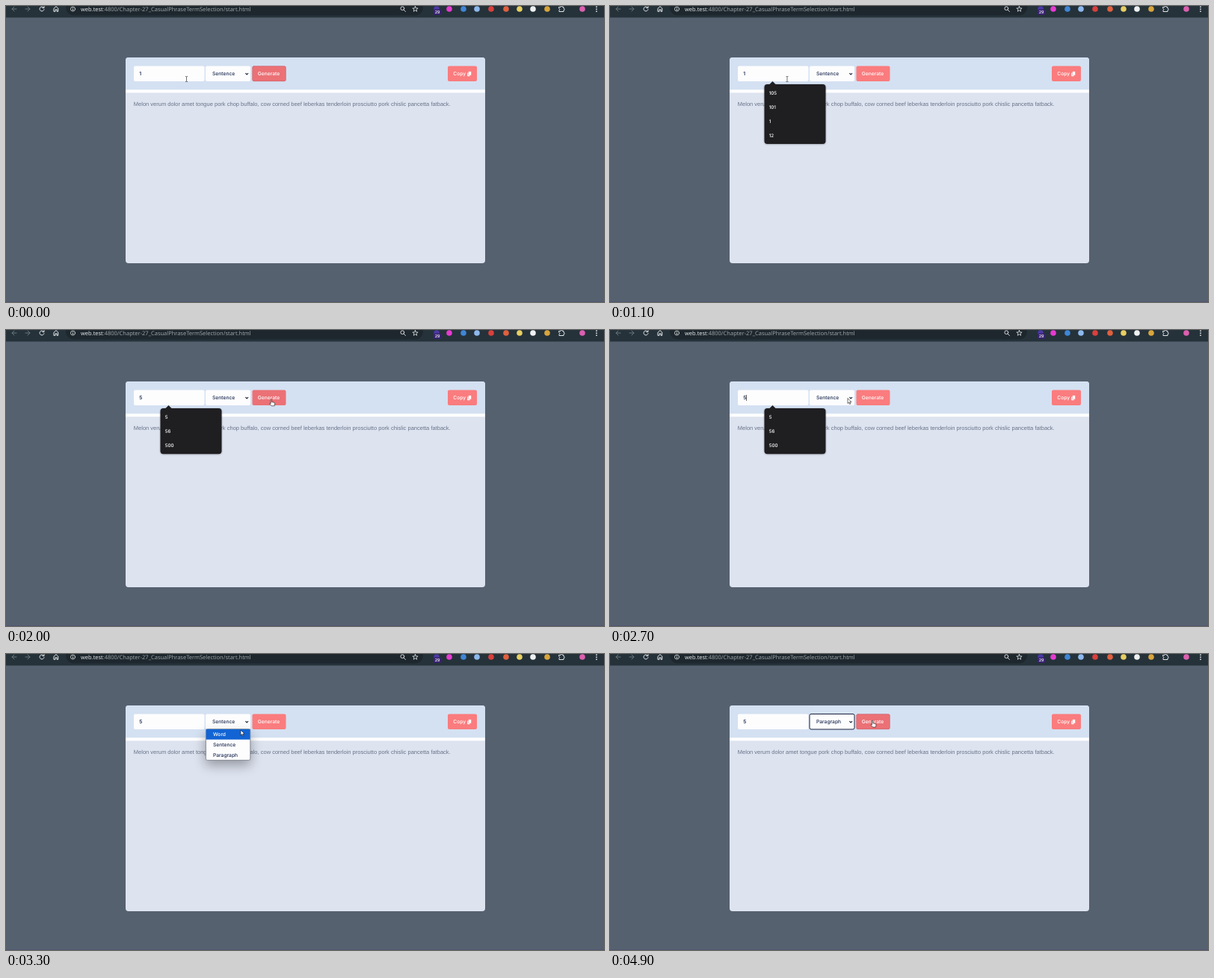
Animation of 800 by 397 pixels, one loop 5000 ms. Source, as an HTML page:

```html
<!DOCTYPE html>
<html lang="en">
<head>
<meta charset="utf-8">
<title>Text generator</title>
<style>
  html, body { margin: 0; width: 100%; height: 100%; overflow: hidden; background: #566170; }
  svg { display: block; width: 100vw; height: 100vh; }
  text { font: 500 6.7px Inter, sans-serif; fill: #1d2b50; text-rendering: geometricPrecision; white-space: pre; }
  .url { font: 7.5px "Open Sans", sans-serif; fill: #a3aaae; }
  .url tspan { fill: #eef1f3; }
  .body { font: 7.52px "Liberation Sans", Arial, sans-serif; fill: #69758a; }
  .light { fill: #fff; }
  .line { fill: none; stroke: #e3e6e8; stroke-linecap: round; stroke-linejoin: round; }
  .dim { stroke: #6b767c; }
</style>
</head>
<body>
<svg viewBox="0 0 800 397">
  <defs>
    <filter id="soft" x="-60%" y="-60%" width="220%" height="260%"><feGaussianBlur stdDeviation="8"/></filter>
    <filter id="near" x="-20%" y="-20%" width="140%" height="140%"><feGaussianBlur stdDeviation="1.2"/></filter>
  </defs>
  <rect width="800" height="397" fill="#566170"/>
  <rect y="396" width="800" height="1" fill="#4f5870"/>

  <!-- browser bar -->
  <rect width="800" height="15.5" fill="#25323a"/>
  <rect x="80" y="-8" width="478" height="20.5" rx="10" fill="#1d272d"/>
  <g class="line">
    <path class="dim" d="M14 4H8M11 1L8 4L11 7M26 4h6M29 1l3 3l-3 3"/>
    <path d="M50.5 2.2A3 3 0 1 0 51 4.6M51 0.6V2.6H48.8"/>
    <path d="M64.3 3L67 .6L69.700 3V7.300H68V4.800H66V7.300H64.300Z"/>
    <circle cx="89.500" cy="4" r="3" stroke-width=".8"/>
    <path d="M89.500 4V5.700M89.500 2.300v.1" stroke-width=".9"/>
    <circle cx="530.300" cy="3.200" r="2.400" stroke-width=".9"/>
    <path d="M532.200 5.200L534.500 7.500" stroke-width=".9"/>
    <path id="star" stroke-width=".8"/>
    <path d="M740 1.500H742A1.300 1.300 0 0 1 744.600 1.500H746V3.300A1.200 1.200 0 0 1 746 5.700V7.500H740V5.500A1.200 1.200 0 0 0 740 3.300Z"/>
  </g>
  <text class="url" x="100" y="6.8"><tspan>web.test</tspan>:4800/Chapter-27_CasualPhraseTermSelection/start.html</text>
  <g id="marks"></g>
  <rect x="572" y="4.500" width="10" height="7.500" rx="1.500" fill="#38256f"/>
  <text class="light" x="573.700" y="10.300" style="font-size:5.500px">29</text>
  <g fill="#e3e6e8"><circle cx="790" cy="1.200" r=".9"/><circle cx="790" cy="4.200" r=".9"/><circle cx="790" cy="7.200" r=".9"/></g>

  <!-- card -->
  <rect x="160" y="69" width="481" height="276" rx="4" fill="#dde3ef"/>
  <path d="M160 113V73a4 4 0 0 1 4-4H637a4 4 0 0 1 4 4V113Z" fill="#d4e1f2"/>
  <rect x="160" y="112.300" width="481" height="4" fill="#fff"/>
  <text class="body" x="170.800" y="134.200">Melon verum dolor amet tongue pork chop buffalo, cow corned beef leberkas tenderloin prosciutto pork chislic pancetta fatback.</text>

  <!-- controls -->
  <rect x="171" y="80.500" width="94.500" height="20.500" rx="2" fill="#fdfdfe"/>
  <text id="count" x="178.300" y="93.400" style="font-weight:600"></text>
  <rect id="caret" x="182.300" y="87" width=".7" height="8" fill="#222"/>
  <rect id="select" x="267" y="80.500" width="60" height="20.500" rx="2" fill="#fdfdfe"/>
  <text id="kind" x="276" y="93.400"></text>
  <path d="M320.400 90.200L322.200 92L324 90.200" fill="none" stroke="#1c2440" stroke-width="1.200"/>
  <rect id="go" x="329.500" y="80.500" width="45" height="20.500" rx="2"/>
  <rect id="dots" x="329.700" y="80.700" width="44.600" height="20.100" rx="2" fill="none" stroke="#a9505c" stroke-width=".7" stroke-dasharray="1 1"/>
  <text class="light" x="336.800" y="93.400">Generate</text>
  <rect x="591" y="80.500" width="39" height="20.500" rx="2" fill="#fa7c7e"/>
  <text class="light" x="598.300" y="93.400">Copy</text>
  <rect x="617.200" y="89.400" width="3.600" height="4.800" rx=".6" fill="#fff"/>
  <rect x="618.600" y="87.800" width="3.900" height="5.100" rx=".6" fill="#fff" stroke="#fa7c7e" stroke-width=".5"/>

  <!-- suggestions -->
  <g id="hints">
    <rect id="hintShade" x="206.500" y="105.500" width="82" rx="4" opacity=".35" filter="url(#near)"/>
    <path d="M213 105.500L217.500 101L222 105.500Z" fill="#1f1e21"/>
    <rect id="hintBox" x="206.500" y="105" width="82" rx="4" fill="#1f1e21"/>
    <g id="hintText"></g>
  </g>

  <!-- option list -->
  <g id="menu">
    <rect x="267" y="108" width="60" height="41" opacity=".34" filter="url(#soft)"/>
    <rect x="267.400" y="100.600" width="59.400" height="41.800" rx="2" fill="#fdfdfe" stroke="#646b78" stroke-width=".7"/>
    <rect id="pick" x="267.700" width="58.900" height="13.800" fill="#1264d4"/>
    <g id="options"></g>
  </g>

  <g id="pointer">
    <path id="beam" d="M-1.500 -3.500H-.5L0 -3L.5 -3.500H1.500M0 -3V3M-1.500 3.500H-.5L0 3L.5 3.500H1.500" fill="none" stroke="#333" stroke-width=".7"/>
    <path id="arrow" d="M0 0V7L1.600 5.500L2.700 8L3.800 7.500L2.700 5.100H5Z" fill="#fff" stroke="#111" stroke-width=".6"/>
    <path id="hand" d="M-.8 4.800V-.4a.7 .7 0 0 1 1.400 0V2.600l3 .6q1.200 .2 1.100 1.500L4.200 7.800H.2L-2.200 5.200q-.3-1 .6-.9Z" fill="#fff" stroke="#111" stroke-width=".6"/>
  </g>
</svg>
<script>
const $ = id => document.getElementById(id);
const show = (id, on) => $(id).style.display = on ? "" : "none";

const marks = [[576, "#4b39a5"], [593, "#e63bd0"], [612, "#3f86d6"], [630, "#8db9ee"], [649, "#d9403c"],
  [669, "#e0603f"], [687, "#e8cf62"], [705, "#eef0f2"], [724, "#d9a53c"], [771, "#dd5fb0"]];
$("marks").innerHTML = marks.map(([x, c]) => `<circle cx="${x}" cy="4" r="3.8" fill="${c}"/>`).join("");

const star = Array.from({ length: 10 }, (_, i) => {
  const a = (i / 5 - .5) * Math.PI, r = i % 2 ? 1.6 : 3.8;
  return `${547.5 + r * Math.cos(a)} ${4.2 + r * Math.sin(a)}`;
});
$("star").setAttribute("d", `M${star.join("L")}Z`);

const kinds = ["Word", "Sentence", "Paragraph"];
$("options").innerHTML = kinds.map((k, i) => `<text x="277" y="${110 + 13.8 * i}">${k}</text>`).join("");

// time, x, y of the pointer
const path = [
  [0, 241.5, 98], [600, 237, 98], [1500, 237, 98], [2000, 355, 94], [2200, 368, 92], [2600, 322, 92.5],
  [2700, 318, 91.5], [3000, 318, 91.5], [3300, 314, 102], [3600, 314, 104], [3800, 312, 118],
  [4100, 310, 131], [4300, 310, 131], [4700, 349, 92], [4900, 351.3, 90.3]
];

function pointerAt(t) {
  const i = path.findIndex(p => p[0] >= t);
  if (i < 1) return path[0].slice(1);
  const [a, b] = [path[i - 1], path[i]];
  const u = (t - a[0]) / (b[0] - a[0]), k = u * u * (3 - 2 * u);
  return [a[1] + (b[1] - a[1]) * k, a[2] + (b[2] - a[2]) * k];
}

function setHints(list) {
  show("hints", list.length);
  const height = 4.5 + 18.9 * list.length;
  $("hintBox").setAttribute("height", height);
  $("hintShade").setAttribute("height", height);
  $("hintText").innerHTML = list.map((s, i) =>
    `<text class="light" x="212.7" y="${119.3 + 18.8 * i}" style="font-size:6.3px">${s}</text>`).join("");
}

function draw(t) {
  const [x, y] = pointerAt(t);
  const within = (l, r) => x >= l && x <= r && y >= 80 && y <= 101;
  const menu = t >= 3100 && t < 4300;
  const overInput = within(171, 265), overGo = within(329, 374);

  $("count").textContent = t < 1300 ? "1" : "5";
  show("caret", t >= 300 && t < 800 || t >= 1300 && t < 1900 || t >= 2400 && t < 3100);
  setHints(t >= 300 && t < 1200 ? ["105", "101", "1", "12"] : t >= 1500 && t < 3100 ? ["5", "56", "500"] : []);

  $("kind").textContent = kinds[t < 4300 ? 1 : 2];
  $("select").setAttribute("stroke", t >= 4300 ? "#17203c" : "none");
  show("menu", menu);
  const row = t < 3300 ? 1 : t < 3800 ? 0 : t < 4000 ? 1 : 2;
  $("pick").setAttribute("y", 100.9 + 13.8 * row);
  [...$("options").children].forEach((o, i) => o.style.fill = i === row ? "#fff" : "");

  $("go").setAttribute("fill", t < 200 || overGo ? "#eb7176" : "#fa7c7e");
  show("dots", t < 200 || t >= 4900);

  show("beam", overInput);
  show("hand", overGo);
  show("arrow", !overInput && !overGo);
  $("pointer").setAttribute("transform", `translate(${x} ${y})`);
}

const start = performance.now();
function tick() {
  const t = (performance.now() - start) % 5000;
  draw(Math.floor(t / 100) * 100);
  requestAnimationFrame(tick);
}
tick();
</script>
</body>
</html>
```
